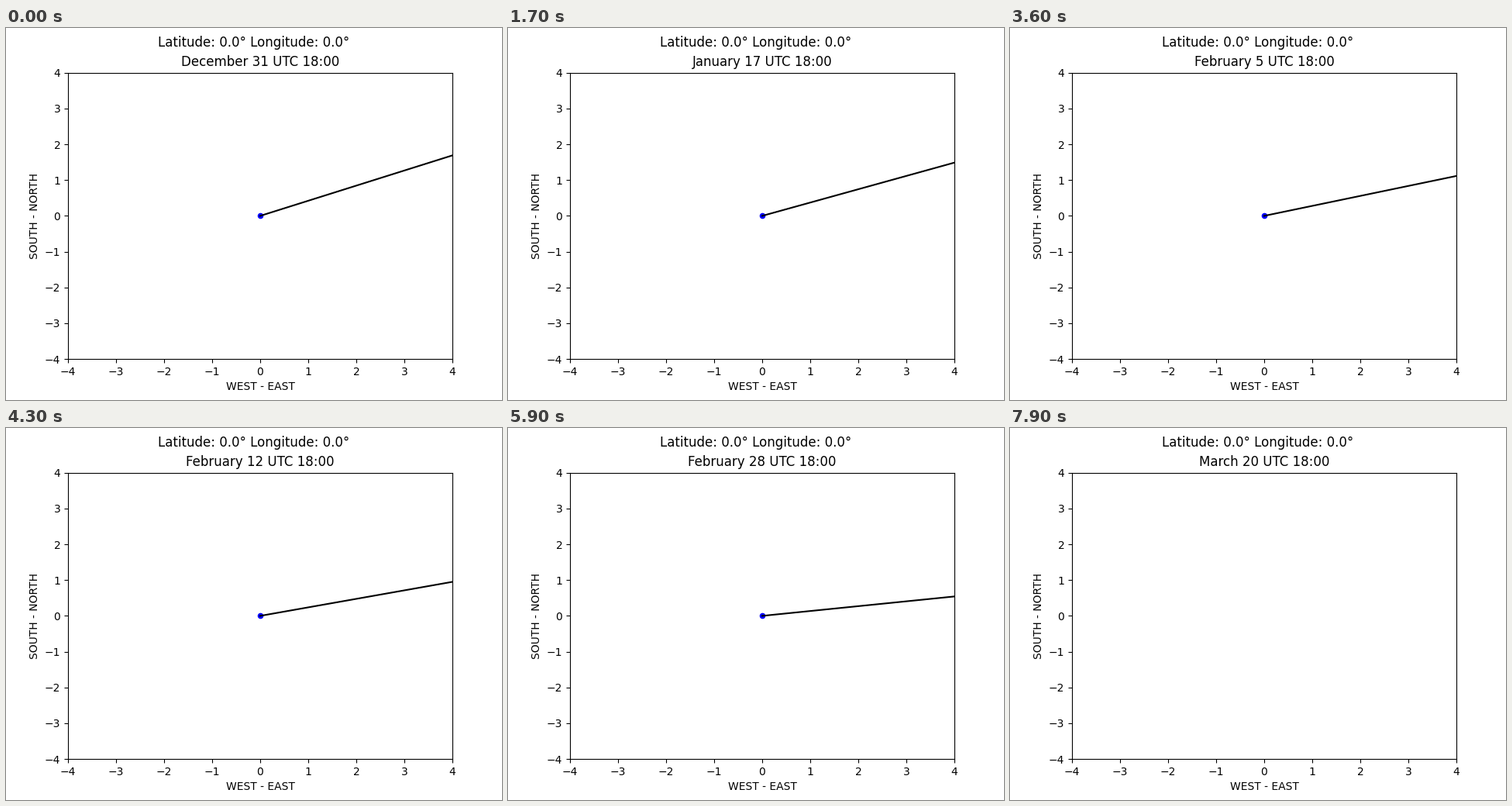
These frames come from a looping animation (640x480 px, 8000 ms). A matplotlib script:

```python
import numpy as np
import matplotlib.pyplot as plt
from matplotlib.animation import FuncAnimation

DAYS = 80
EQUINOX = 79                 # days from December 31 to the March equinox
YEAR = 365.25
TILT = np.radians(23.44)
MONTHS = [("December", 1), ("January", 31), ("February", 28), ("March", 31)]


def date_label(day):
    """Month and day of month, counted from December 31."""
    if day == 0:
        return "December 31"
    for name, length in MONTHS[1:]:
        if day <= length:
            return f"{name} {day}"
        day -= length


def shadow_tip(day):
    """Tip of a unit pole's shadow on the equator at 18:00, or None at night."""
    lon = 2 * np.pi * (day - EQUINOX) / YEAR
    dec = np.arcsin(np.sin(TILT) * np.sin(lon))
    ascension = np.arctan2(np.cos(TILT) * np.sin(lon), np.cos(lon))
    hour = np.pi / 2 + lon - ascension
    up = np.cos(dec) * np.cos(hour)
    if up < 1e-9:
        return None
    east, north = -np.cos(dec) * np.sin(hour), np.sin(dec)
    return -east / up, -north / up


fig, ax = plt.subplots(figsize=(6.4, 4.8), dpi=100)
fig.suptitle("Latitude: 0.0° Longitude: 0.0°")
ax.set(xlim=(-4, 4), ylim=(-4, 4), xlabel="WEST - EAST", ylabel="SOUTH - NORTH")
title = ax.set_title("")
pole = ax.scatter([0], [0], s=20, color="blue", zorder=1.5)
shadow, = ax.plot([], [], color="black", lw=1.5)


def draw(day):
    title.set_text(f"{date_label(day)} UTC 18:00")
    tip = shadow_tip(day)
    for artist in (pole, shadow):
        artist.set_visible(tip is not None)
    if tip:
        # Keep the direction but stop just outside the axes.
        scale = min(1, 8 / tip[0])
        shadow.set_data([0, tip[0] * scale], [0, tip[1] * scale])
    return title, pole, shadow


anim = FuncAnimation(fig, draw, frames=DAYS, init_func=lambda: draw(0),
                     interval=100, repeat=True, repeat_delay=0, blit=False)
plt.show()
```
